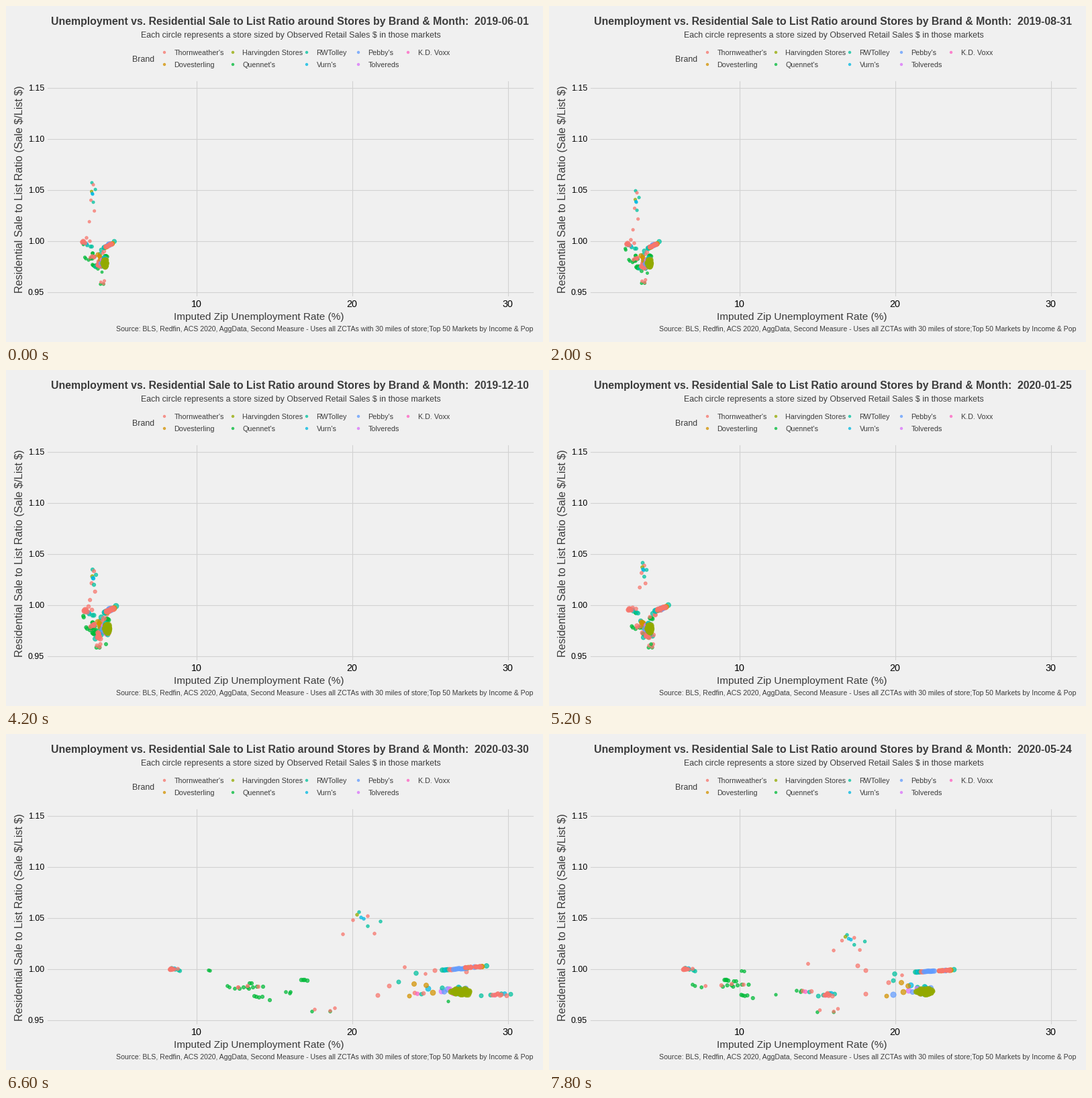
These frames come from a looping animation (800 by 500 pixels, 8 s). A matplotlib script:

```python
import numpy as np
import matplotlib.pyplot as plt
from matplotlib.animation import FuncAnimation

W, H, DPI = 800, 500, 100
FRAMES, STEP = 40, 200
DAYS_PER_FRAME = 9.185
KEYS = np.array([0, 6, 14, 21, 30, 33, 39])
GROWTH = np.array([1, 1, 1.05, 1.25, 1.1, 1.1, 1.1])
DRIFT = np.array([0, 0, 3, 5])  # slow fall of the quiet months, in pixels

BRANDS = {
    "R": ("Thornweather's", "#F8766D"),
    "O": ("Dovesterling", "#D39200"),
    "L": ("Harvingden Stores", "#93AA00"),
    "G": ("Quennet's", "#00BA38"),
    "T": ("RWTolley", "#00C19F"),
    "K": ("Vurn's", "#00B9E3"),
    "B": ("Pebby's", "#619CFF"),
    "P": ("Tolvereds", "#DB72FB"),
    "M": ("K.D. Voxx", "#FF61C3"),
}
INK, BACK, GRID = "#3C3C3C", "#F0F0F0", "#D2D2D2"

rng = np.random.default_rng(7)
paths, radii, brands = [], [], []


def expand(vals):
    """Four values (quiet, March, April, May) become seven keys."""
    vals = np.asarray(vals, float)
    return vals if len(vals) == 7 else np.r_[[vals[0]] * 3, vals]


def group(names, xs, ys, sx, sy, u, v, r, late=None):
    """Stores that share a path; u and v are offsets from its centre."""
    xs, ys, sx, sy = map(expand, (xs, ys, sx, sy))
    late = v if late is None else late
    r = np.broadcast_to(r, len(u))
    for i, name in enumerate(names):
        off = np.r_[[v[i]] * 4, [late[i]] * 3]
        paths.append(np.c_[xs + u[i] * sx, ys + off * sy])
        radii.append(r[i])
        brands.append(name)


def solo(name, r, *pts):
    """One store with its own quiet, March, April and May places."""
    p = np.array(pts, float)
    xs, ys = expand(p[:, 0]), expand(p[:, 1])
    ys[:4] += DRIFT
    paths.append(np.c_[xs, ys])
    radii.append(r)
    brands.append(name)


def cloud(n):
    a, d = rng.uniform(0, 2 * np.pi, n), np.sqrt(rng.uniform(0, 1, n))
    return d * np.cos(a), d * np.sin(a)


# high ratio stores at the top
group("TRLKKTRTRR",
      (128, 129, 129, 129, 148, 526, 444), (263, 268, 282, 297, 279, 265, 299),
      (.16, .2, 1, .83), (1, 1, 1, .78, .9, 1, .7),
      (0, 13, -3, 3, 7, 32, -9, 13, 23, -24),
      (0, 3, 13, 16, 17, 10, 26, 29, 42, 58), 2.3,
      late=(0, 6, 4, 8, 10, 14, 12, 21, 32, 33))

# green pair that starts beneath the left cluster
group("GG", (115, 114, 114, 115.5, 140, 303, 289),
      (354, 358, 366, 367, 357, 352, 353),
      (.3, .3, 1, 2), (1, 0, .3, .3), (-1, 1), (-1, 1), 2.3)

# left cluster
group("TTTKTRRRRRRR",
      (115, 116, 118, 118, 121, 246, 202), (351, 352, 356, 358, 355, 350, 350),
      (1, 1, 1, 1, 1, 1, 1.2), (1, .9, .5, .6),
      (1, 6, 11, 5, 13, -2, -1, 0, 1, 3, 5, 10),
      (2, 5, 7, 3, 7, 0, 1, -1, 0, 2, -6, -1),
      [2.7] * 5 + [2.6, 3.2, 3.4, 3.4, 3, 2.5, 2.5],
      late=(-3, 1, 3, -2, 5, 1, 1, -1, 0, 0, 0, -1))

# green clusters around 0.98
group("GGGR", (120, 121, 122, 122, 129, 335, 220),
      (376, 377, 382, 385, 382, 377, 375),
      (.5, .5, 1, 1.2), (1, 1, 1, 1), (-5, -2, 6, 11), (-2, 0, 2, 0), 2.4)
group("GGGGGGGGGRRR",
      (128, 128, 128, 128, 146, 358, 270), (374, 375, 380, 382, 381, 377, 374),
      (.17, .3, 1, 1.1), (1, 1, 1, 1),
      (-10, -4, 2, 4, 5, 8, 10, 16, 25, -12, 2, 18),
      (2, 0, 0, 2, -6, -6, 0, -1, -1, 0, -2, -1), 2.6)
group("GGGGG", (131, 132, 132, 131, 151, 376, 291),
      (386, 388, 391, 392, 394, 391, 389),
      (.35, .35, 1, .75), (1, 1, 1, .8),
      (-6, -3, 1, 6, 17), (-1, 0, 1, 0, 5), 2.6)
group("GGG", (133, 157, 421, 373), (388, 379, 385, 383),
      (.4, .4, 1, 1), (1, 1, 1, 1), (-4, 2, 3), (-1, 1, -1), 2.4)
group("GGGG", (149, 150, 151, 151, 153, 444, 264),
      (372, 372, 371, 371, 368, 366, 366),
      (.35, .4, 1, .6), (1, 1, 1, 1), (-4, -1, 1, 5), (0, 0, 0, 1), 2.8)

# lowest stores
group("GGRRR", (144, 142.5, 140, 138, 163.5, 475, 417),
      (412, 410.5, 410.5, 411, 411, 411, 412),
      (.17, .22, 1, .9), (1, 1, 1, 1),
      (-19, 8, -15, 8, 15), (2, 2, -1, 1, -3), 2.3)
group("G", (143, 145.5, 147.5, 149, 154.5, 659, 338),
      (396, 394, 401, 408, 408, 398, 388),
      (0, 0, 0, 0), (0, 0, 0, 0), [0], [0], 2.2)

# teal and blue strays
solo("T", 3.2, (142, 363), (165, 358), (611, 356), (515, 357))
solo("T", 3, (140, 369), (134, 373), (585, 369), (513, 367))
solo("B", 4, (142, 378), (142, 381), (658, 380), (513, 388))
solo("K", 3.8, (143, 379), (142, 383), (629, 379), (539, 374))
solo("P", 3.8, (144, 377), (143, 380), (649, 383), (536, 382))
solo("T", 3.2, (141, 380), (145, 378), (650, 378), (549, 377))

# right end of the low band
group("RMTR", (141, 142, 143, 150, 155, 615, 384),
      (386, 388, 390, 392, 396, 386, 383),
      (.4, .4, 1, 1), (1, 1, .6, .5), (-6, -2, 4, 7), (-1, 1, 2, 0), 2.8)
group("TTTKTMRRRRRRR",
      (138, 139, 140, 138, 153, 733, 415), (384, 385, 388, 396, 393, 388, 388),
      (.2, .25, 1, .55), (4, 3.5, 1.5, 2),
      (-25, 5, 19, 10, -11, -5, -8, -1, 3, 5, 13, 0, -4),
      (1, -.9, -.5, -1, .3, .5, .4, -.6, .7, 0, 1, -1, .2), 3)

# orange and red strays
solo("O", 3, (139, 372), (138, 375), (601, 390), (503, 390))
solo("O", 3.4, (137, 370), (139, 376), (608, 372), (525, 370))
solo("O", 3.4, (140, 373), (142, 377), (626, 374), (535, 375))
solo("O", 3.8, (141, 377), (141, 381), (636, 385), (528, 384))
solo("R", 2.4, (132, 373), (165, 359), (594, 347), (386, 342))
solo("R", 3, (146, 365), (168, 360), (639, 352), (460, 345))
solo("R", 2.3, (144, 368), (170, 357), (625, 357), (526, 359))
solo("R", 3, (131, 374), (131, 382), (571, 375), (506, 370))
solo("R", 3, (137, 386), (141, 391), (554, 389), (472, 387))
solo("R", 3, (150, 358), (180, 353), (686, 354), (472, 352))

# big cluster around 0.978: mixed brands under a dense olive mass
u, v = cloud(14)
group("PBTKMBPTKMBTPB",
      (145.5, 147, 148, 148, 147, 671, 557), (381, 381, 382, 384, 383, 382, 382),
      (4.5, 5, 20, 17), (6.5, 6, 5, 6), u, v, 3.5)
u, v = cloud(46)
group("L" * 46,
      (147.5, 149, 150.5, 151, 149.5, 677, 560),
      (383, 382.5, 383, 385, 385, 383.5, 383.5),
      (3.2, 3.4, 14.5, 13), (6, 5.5, 4.5, 4.5), u, v,
      rng.uniform(2.6, 4.2, 46))
u, v = cloud(9)
group("L" * 9,
      (147.5, 149, 150.5, 151, 149.5, 687, 566),
      (383, 383, 384, 385, 385, 384, 382.5),
      (2, 2, 3.5, 5), (4, 4, 4, 3), u, v, 4.2)

# band just around 1.00, rising to the right
left = "TTKTRRBBBBBBBB"
u = np.linspace(-1, 1, len(left))
v = -u + rng.normal(0, .25, len(left))
group(left, (151, 152, 153, 152, 174, 668, 560),
      (356.5, 357, 358, 358, 355, 350, 353.5),
      (5, 5, 5, 5, 7, 18, 14), (3.2, 1.5, 1.4, .9), u, v, 3.4)
right = "TLOBORRORRRORRRRRRRR"
u = np.r_[1.4, -.9, rng.uniform(-1, 1, len(right) - 2)]
v = -u + rng.normal(0, .25, len(right))
group(right, (153.5, 155.5, 156, 155.5, 179, 697, 590),
      (356.5, 356.5, 357, 357.5, 352.5, 347, 352),
      (5.6, 6, 6, 6, 7, 13.5, 9.5), (3.2, 2, 1, .7), u, v,
      rng.uniform(2.8, 3.8, len(right)))

paths, radii = np.array(paths), np.array(radii)


def areas(r):
    return (2 * (np.asarray(r) - .3) * 72 / DPI) ** 2


def rgba(names):
    return [plt.matplotlib.colors.to_rgba(BRANDS[n][1], .72) for n in names]


plt.rcParams["font.family"] = "Liberation Sans"
fig = plt.figure(figsize=(W / DPI, H / DPI), dpi=DPI, facecolor=BACK)
ax = fig.add_axes([0, 0, 1, 1])
ax.set(xlim=(0, W), ylim=(H, 0))
ax.axis("off")


def label(x, y, s, px, color=INK, **kw):
    kw.setdefault("va", "baseline")
    return ax.text(x, y, s, fontsize=px * 72 / DPI, color=color,
                   parse_math=False, **kw)


def dots(names, xy, r):
    c = rgba(names)
    xy = np.asarray(xy, float)
    return ax.scatter(xy[:, 0], xy[:, 1], s=areas(r), c=c, edgecolors=c,
                      linewidths=.7, zorder=3)


for k in range(5):
    y = 121.5 + 76 * k
    ax.plot([62, 785], [y, y], color=GRID, lw=.8, zorder=1)
    label(57, y + 5, f"{1.15 - .05 * k:.2f}", 12.4, "black", ha="right")
for k in range(3):
    x = 283.5 + 232 * k
    ax.plot([x, x], [112, 431], color=GRID, lw=.8, zorder=1)
    label(x, 448, str(10 * (k + 1)), 14.2, "black", ha="center")

title = label(67, 28, "", 15.92, weight="bold")
label(424, 47, "Each circle represents a store sized by Observed Retail Sales $"
      " in those markets", 12.33, ha="center")
label(376.5, 467, "Imputed Zip Unemployment Rate (%)", 15.45, ha="center")
label(28, 272.5, "Residential Sale to List Ratio (Sale $/List $)", 16.05,
      rotation=90, ha="right", va="center", rotation_mode="default")
label(785, 484, "Source: BLS, Redfin, ACS 2020, AggData, Second Measure - Uses all"
      " ZCTAs with 30 miles of store;Top 50 Markets by Income & Pop", 10.48,
      ha="right")

label(188, 83, "Brand", 12.4)
columns = (236, 338, 448, 525, 599)
spots = [(columns[i // 2], 69 + 18 * (i % 2)) for i in range(len(BRANDS))]
for (x, y), (name, _) in zip(spots, BRANDS.values()):
    label(x + 14.5, y + 4, name, 10.8)
dots(BRANDS, spots, 2)

stores = dots(brands, paths[:, 0], radii)
START = np.datetime64("2019-06-01")


def draw(i):
    j = min(np.searchsorted(KEYS, i, side="right") - 1, len(KEYS) - 2)
    w = (i - KEYS[j]) / (KEYS[j + 1] - KEYS[j])
    stores.set_offsets(paths[:, j] * (1 - w) + paths[:, j + 1] * w)
    stores.set_sizes(areas(radii * np.interp(i, KEYS, GROWTH)))
    day = START + int(DAYS_PER_FRAME * i)
    title.set_text("Unemployment vs. Residential Sale to List Ratio around"
                   f" Stores by Brand & Month:  {day}")
    return stores, title


anim = FuncAnimation(fig, draw, frames=FRAMES, interval=STEP, repeat=True,
                     repeat_delay=0, blit=False)
plt.show()
```
